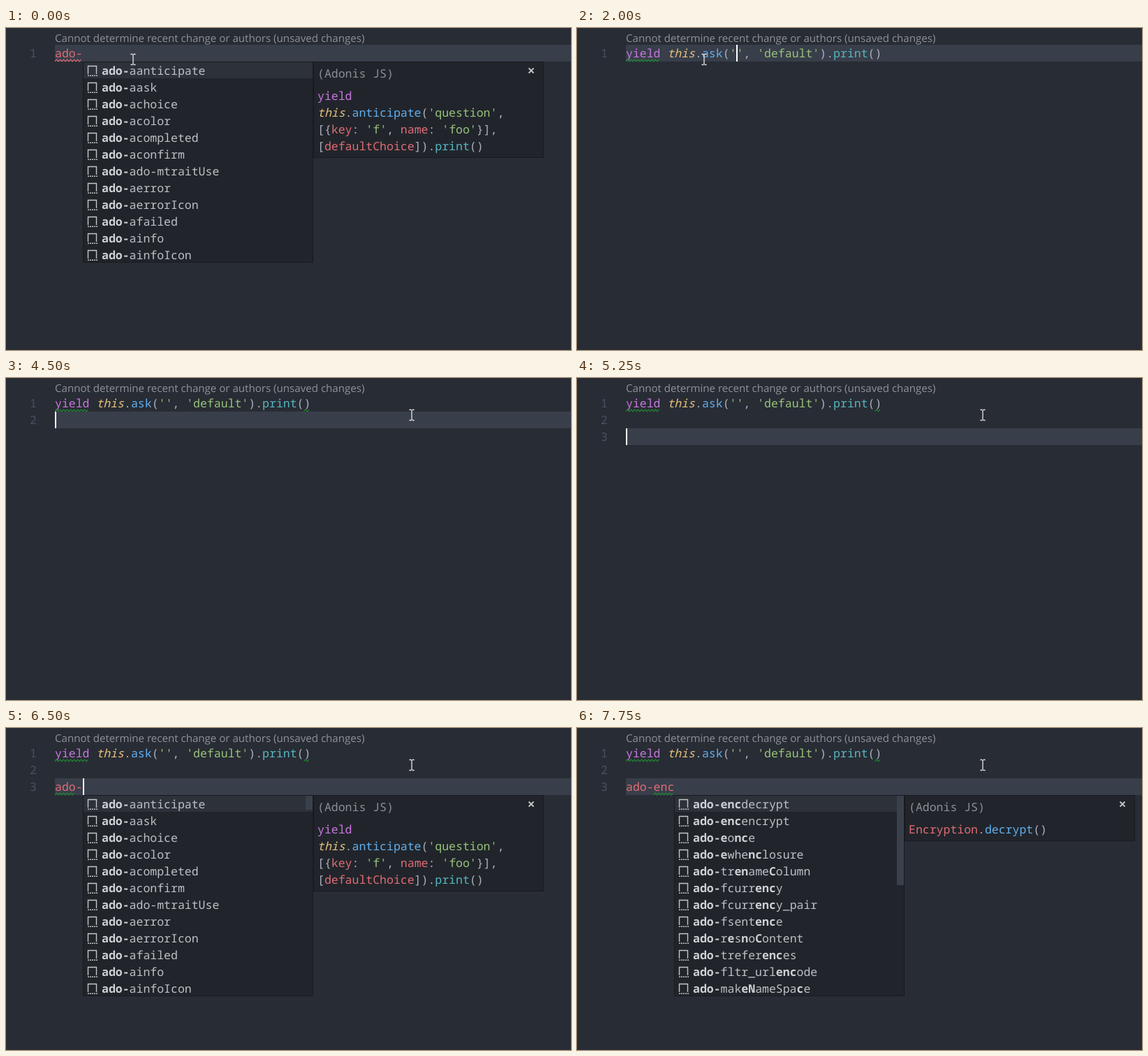
Write an HTML page that moves like this. It is 809 px wide and 461 px high and loops after 8 s.

```html
<!DOCTYPE html>
<html lang="en">
<head>
<meta charset="utf-8">
<style>
  html, body { margin: 0; width: 100%; height: 100%; overflow: hidden; background: #282c34; }
  svg { display: block; width: 809px; height: 461px; }
  text { font: 16.5px "Noto Sans Mono", monospace; white-space: pre; fill: #abb2bf; text-rendering: geometricPrecision; }
  .lens { font: 15.1px "Open Sans", sans-serif; fill: #8f9298; }
  .number { fill: #495162; text-anchor: end; }
  .item { fill: #bdc0c6; }
  .item tspan { font-weight: bold; fill: #cfd1d6; }
  .note { fill: #8b8f96; }
  .panel { fill: #21252b; stroke: #181a1f; }
  path { fill: none; }
</style>
</head>
<body>
<svg id="stage" viewBox="0 0 809 461"></svg>
<script>
const LOOP = 8000, LEFT = 70, CHAR = 9.9, ROW = 24;
const RED = '#e06c75', GREEN = '#98c379', BLUE = '#61afef', CYAN = '#56b6c2', PURPLE = '#c678dd', YELLOW = '#e5c07b';
const SPELL = '#1f8a32';

const names = text => text.split(' ').map(name => 'ado-' + name);
const all = names('aanticipate aask achoice acolor acompleted aconfirm ado-mtraitUse aerror aerrorIcon afailed ainfo ainfoIcon');
const withE = names('eany encdecrypt encencrypt eonce ewhen ewhenclosure extends aerror aerrorIcon getEnv setEnv makeNameSpace');
const withEn = names('encdecrypt encencrypt eany eonce getEnv setEnv ewhen ewhenclosure extends makeNameSpace qwhereNot qwhereNotBetween');
const withEnc = names('encdecrypt encencrypt eonce ewhenclosure trenameColumn fcurrency fcurrency_pair fsentence resnoContent treferences fltr_urlencode makeNameSpace');

const anticipate = ['yield', "this.anticipate('question',", "[{key: 'f', name: 'foo'}],", '[defaultChoice]).print()'];
const ask = ["yield this.ask('',", "'default').print()"];
const decrypt = ['Encryption.decrypt()'];
const askLine = "yield this.ask('', 'default').print()";
const typing = text => [askLine, '', text];
const askWaves = [[0, 0, 5, SPELL], [0, 36, 37, SPELL]];
const wavesWith = (from, to) => [...askWaves, [2, from, to, SPELL]];

// Each step overrides part of the editor state. Waves are [line, from, to, colour].
const steps = [
  [0, { lines: ['ado-'], active: 0, caret: -1, waves: [[0, 0, 4, RED]], list: all, picked: 0, doc: anticipate, bar: 0, mouse: [182, 45] }],
  [500, { caret: 4, picked: 1, doc: ask }],
  [750, { caret: -1 }],
  [1250, { caret: 4 }],
  [1750, { lines: [askLine], caret: 16, waves: [], list: null, doc: null }],
  [2000, { waves: askWaves.slice(0, 1) }],
  [2250, { caret: -1 }],
  [2750, { caret: 16 }],
  [3250, { caret: -1, endMark: true, waves: askWaves, mouse: [623, 82] }],
  [3500, { mouse: [581, 53] }],
  [3750, { caret: 37, endMark: false }],
  [4250, { caret: -1 }],
  [4500, { lines: [askLine, ''], active: 1, caret: 0 }],
  [5000, { caret: -1 }],
  [5250, { lines: typing(''), active: 2, caret: 0 }],
  [5500, { lines: typing('ad'), caret: 2 }],
  [5750, { list: all, picked: 0, bar: 20, waves: wavesWith(0, 2) }],
  [6000, { lines: typing('ado'), caret: 3, doc: anticipate }],
  [6250, { waves: wavesWith(0, 3) }],
  [6500, { lines: typing('ado-'), caret: 4 }],
  [6750, { lines: typing('ado-e'), caret: 5, list: withE, doc: ['Event.any()'], waves: askWaves }],
  [7000, { lines: typing('ado-en'), caret: 6, list: withEn, doc: decrypt, bar: 22, waves: wavesWith(4, 6) }],
  [7250, { lines: typing('ado-enc'), caret: 7, list: withEnc, bar: 128, waves: wavesWith(4, 7) }],
  [7750, { caret: -1 }]
];

const rect = (x, y, w, h, fill) => `<rect x="${x}" y="${y}" width="${w}" height="${h}" fill="${fill}"/>`;
const panel = (x, y, w, h) => `<rect class="panel" x="${x + .5}" y="${y + .5}" width="${w - 1}" height="${h - 1}"/>`;
const label = (x, y, content, name = '') => `<text x="${x}" y="${y}" class="${name}">${content}</text>`;
const stroke = (d, color, width = 1) => `<path d="${d}" stroke="${color}" stroke-width="${width}"/>`;

function highlight(code) {
  const colors = [GREEN, PURPLE, YELLOW, CYAN, BLUE, RED];
  return code.replace(/('[^']*')|(yield)|(this)|(print)|(\w+(?=\())|([\w-]+)/g, (word, ...groups) => {
    const kind = groups.slice(0, 6).findIndex(Boolean);
    return `<tspan fill="${colors[kind]}"${kind === 2 ? ' font-style="italic"' : ''}>${word}</tspan>`;
  });
}

// Bold the typed prefix and, after it, the fuzzy-matched letters.
function emphasize(name, typed) {
  const prefix = typed.slice(0, 4), rest = typed.slice(4), tail = name.slice(prefix.length);
  const start = tail[0] === rest[0] ? 0 : Math.max(0, tail.toLowerCase().indexOf(rest));
  let matched = 0;
  const letters = [...tail].map((letter, i) =>
    i >= start && letter.toLowerCase() === rest[matched] ? (matched++, `<tspan>${letter}</tspan>`) : letter);
  return `<tspan>${prefix}</tspan>${letters.join('')}`;
}

function wave([line, from, to, color]) {
  const y = line * ROW + 46.5, end = LEFT + to * CHAR;
  let d = '';
  for (let x = LEFT + from * CHAR, i = 0; x <= end; x += 2.5, i++) d += `${i ? 'L' : 'M'}${x} ${y + (i % 2 ? -1.3 : 1.3)}`;
  return stroke(d, color, 1.2);
}

function suggestions({ list, picked, doc, bar, lines, active }) {
  const typed = lines[active], x = Math.round(LEFT + typed.length * CHAR), y = 48 + active * ROW;
  let out = panel(x, y, 330, 288) + rect(x + 1, y + 1 + picked * ROW, 328, ROW - (picked ? 0 : 1), '#2c313a');
  list.forEach((name, i) => {
    const top = y + 1 + i * ROW;
    out += stroke(`M${x + 7.5} ${top + 17}v-11.5h12v11.5`, '#c5c5c5', 1.4)
      + `<path d="M${x + 7} ${top + 19.3}h14" stroke="#c5c5c5" stroke-width="1.4" stroke-dasharray="2 1"/>`
      + label(x + 27, top + 18, emphasize(name, typed), 'item');
  });
  if (bar) out += rect(x + 319, y + 1, 10, bar, '#3a404b');
  if (!doc) return out;
  const side = x + 330;
  out += panel(side, y, 330, 42 + doc.length * ROW) + label(side + 6, y + 23, '(Adonis JS)', 'note')
    + stroke(`M${side + 308.5} ${y + 9.5}l7 7m0-7l-7 7`, '#c5c5c5', 1.8);
  doc.forEach((code, i) => out += label(side + 6, y + 55 + i * ROW, highlight(code)));
  return out;
}

function render(state) {
  const { lines, active, caret, waves, list, mouse, endMark } = state;
  const top = 24 + active * ROW;
  let out = rect(LEFT, top, 739, ROW, '#383e4a')
    + label(LEFT, 20, 'Cannot determine recent change or authors (unsaved changes)', 'lens');
  lines.forEach((code, i) => {
    const y = 42 + i * ROW;
    out += label(44, y, i + 1, 'number') + label(LEFT, y, highlight(code));
  });
  out += waves.map(wave).join('');
  if (endMark) out += rect(436, top, 1, ROW, '#55645f');
  if (caret >= 0) out += rect(Math.round(LEFT + caret * CHAR), top, 2, ROW, '#fff');
  if (list) out += suggestions(state);
  out += `<g transform="translate(${mouse})">${stroke('M-3.5-7.5h3m1 0h3M0-7V7M-3.5 7.5h3m1 0h3', '#e8e8e8', 1.3)}</g>`;
  stage.innerHTML = out;
}

const stage = document.getElementById('stage');
let shown = 0;
function tick() {
  const now = performance.now() % LOOP;
  const past = steps.filter(([time]) => time <= now);
  if (past.length !== shown) {
    shown = past.length;
    render(Object.assign({}, ...past.map(([, change]) => change)));
  }
  requestAnimationFrame(tick);
}
tick();
</script>
</body>
</html>
```
